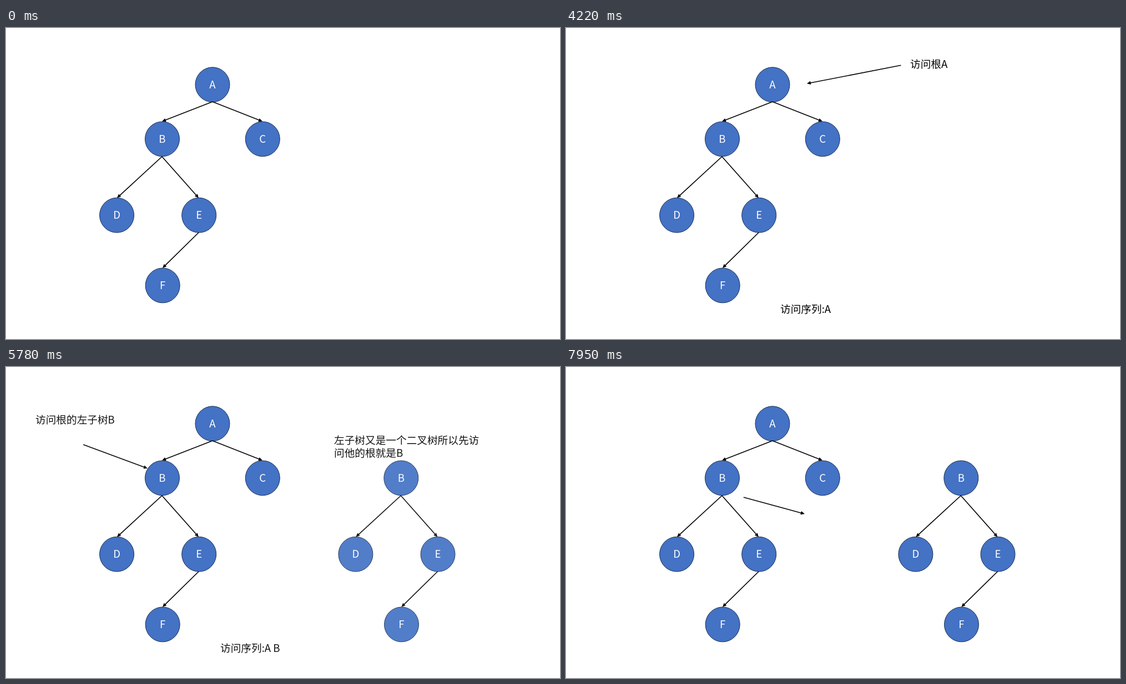
Animation, 998 px wide and 561 px high, one loop 7990 ms. Source, as an HTML page:

```html
<!DOCTYPE html>
<html lang="zh-CN">
<head>
<meta charset="utf-8">
<title>二叉树遍历</title>
<style>
  html, body { margin: 0; width: 100%; height: 100%; overflow: hidden; background: #fff; }
  svg { display: block; width: 998px; height: 561px; }
  text { font: 300 18.67px "Noto Sans CJK SC", "Noto Sans CJK", sans-serif; }
  .node ellipse { fill: #4472c4; stroke: #172c51; stroke-width: 1; }
  .node text { fill: #fff; text-anchor: middle; }
  line { stroke: #000; stroke-width: 1.6; }
</style>
</head>
<body>
<svg id="stage" viewBox="0 0 998 561"></svg>
<script>
const LOOP = 7990, MORPH = 2000, STEP = 40;
const MORPH_STARTS = [1090, 4180, 7270];
const FIRST_VISIBLE = 2010;

const NODES = {
  A: [372, 102.2], B: [281.5, 200.3], C: [462.3, 200.3],
  D: [199.6, 337.7], E: [347.7, 337.7], F: [282.2, 464.4]
};
const EDGES = {
  AB: [372, 133, 281, 168.5], AC: [372, 133, 462, 168.5],
  BD: [281, 232, 200, 306.5], BE: [281, 232, 347, 306.5],
  EF: [347, 369, 282, 433]
};
const SUBTREE_OFFSET = 430.3;

// Pointer arrow poses: tail x, tail y, tip x, tip y
const POSES = [[605, 67, 434.5, 100], [127, 142, 250, 185], [485, 314.5, 584, 333.5]];

const lerp = (a, b, p) => a + (b - a) * p;
const clamp = v => Math.min(1, Math.max(0, v));

const label = (x, y, s) => `<text x="${x}" y="${y}">${s}</text>`;

function arrow([x1, y1, x2, y2]) {
  const len = Math.hypot(x2 - x1, y2 - y1);
  const angle = Math.atan2(y2 - y1, x2 - x1) * 180 / Math.PI;
  return `<g transform="translate(${x1} ${y1}) rotate(${angle})">
    <line x2="${len - 4}"/><path d="M${len} 0l-7-3.2v6.4z"/></g>`;
}

function node(name) {
  const [x, y] = NODES[name];
  return `<g class="node"><ellipse cx="${x}" cy="${y}" rx="31" ry="31.4"/>${label(x, y + 6.5, name)}</g>`;
}

function tree(nodes, edges) {
  return [...nodes].map(node).join('') + edges.map(e => arrow(EDGES[e])).join('');
}

document.getElementById('stage').innerHTML = `
  ${tree('ABCDEF', Object.keys(EDGES))}
  <g id="subtree" transform="translate(${SUBTREE_OFFSET} 0)">${tree('BDEF', ['BD', 'BE', 'EF'])}</g>
  <g id="rootNotes">${label(620, 72, '访问根A')}${label(386, 514, '访问序列:A')}</g>
  <g id="leftNotes">
    ${label(53, 102, '访问根的左子树B')}
    ${label(591, 139, '左子树又是一个二叉树所以先访')}
    ${label(591, 162, '问他的根就是B')}
    ${label(386, 514, '访问序列:A B')}
  </g>
  <g id="pointer"></g>`;

const [subtree, rootNotes, leftNotes, pointer] =
  ['subtree', 'rootNotes', 'leftNotes', 'pointer'].map(id => document.getElementById(id));

// Short acceleration, long deceleration
function ease(t) {
  return t < 0.18 ? 0.22 * (t / 0.18) ** 1.9 : 1 - 1.261 * (1 - t) ** 2.42;
}

function progress(time, start) {
  const t = Math.floor((time - start) / STEP) * STEP / MORPH;
  return ease(clamp(t));
}

const fadeIn = p => clamp(3 * p - 2);
const fadeOut = p => clamp(1 - 3 * p);

// The arrow is stretched between poses, so it flattens while it flips over
function drawPointer(from, to, p) {
  const [x1, y1, x2, y2] = from.map((v, i) => lerp(v, to[i], p));
  const w = lerp(Math.abs(from[2] - from[0]), Math.abs(to[2] - to[0]), p);
  const h = lerp(Math.abs(from[3] - from[1]), Math.abs(to[3] - to[1]), p);
  pointer.setAttribute('transform',
    `matrix(${(x2 - x1) / w} 0 0 ${(y2 - y1) / h} ${x1} ${y1})`);
  pointer.innerHTML = arrow([0, 0, w, h]);
}

function render(time) {
  const [p1, p2, p3] = MORPH_STARTS.map(start => progress(time, start));
  const intro = time < FIRST_VISIBLE ? 0 : fadeIn(p1);
  pointer.style.opacity = intro;
  rootNotes.style.opacity = intro * fadeOut(p2);
  subtree.style.opacity = fadeIn(p2);
  leftNotes.style.opacity = fadeIn(p2) * fadeOut(p3);
  if (p3 > 0) drawPointer(POSES[1], POSES[2], p3);
  else drawPointer(POSES[0], POSES[1], p2);
}

const origin = performance.now();
function tick() {
  render((performance.now() - origin) % LOOP);
  requestAnimationFrame(tick);
}
tick();
</script>
</body>
</html>
```
